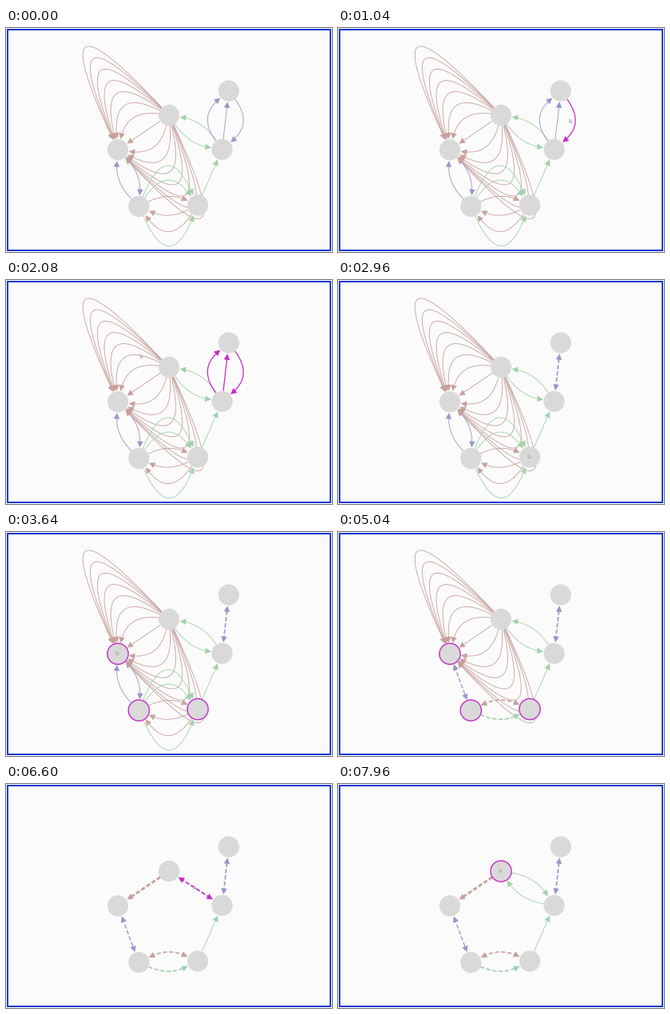
Recreate the animation shown at these times as a matplotlib script. Size 408 px wide and 280 px high, loop 8000 ms.

```python
import numpy as np
import matplotlib.pyplot as plt
from matplotlib.animation import FuncAnimation
from matplotlib.patches import Circle, FancyBboxPatch, PathPatch, Polygon, Rectangle
from matplotlib.path import Path

W, H, DPI = 408, 280, 100
STEP_MS, LOOP_MS = 40, 8000
PX = 72 / DPI            # points per pixel
ZOOM = 0.87
RADIUS = 13.1
SPREAD = 34.7            # gap between control points of parallel edges
HEAD = 29 * ZOOM         # nominal arrow size
PICKED = "#c42cc6"
COLORS = {"R": "#c7a29d", "G": "#a0d2ab", "B": "#9a97c9"}

NODES = {
    "A": (204, 109), "B": (140, 152.3), "C": (166.3, 223),
    "D": (240, 221.5), "E": (270.5, 151.8), "F": (278.8, 78.5),
}

# Bundle of parallel edges: (start ms, tokens). A token is a colour, a direction
# and, for a collapsed edge, the number of edges it stands for.
BUNDLES = {
    "AB": [(0, "R> " * 15), (5960, "R>15")],
    "CD": [(0, "G> G> R> R< R< G>"), (4400, "R=3 G>3")],
    "BC": [(0, "B> B<"), (4400, "B=2")],
    "AE": [(0, "G< G>"), (5960, "G=2"), (7400, "G> G<")],
    "EF": [(0, "B> B> B<"), (2520, "B=3")],
    "DE": [(0, "G>")],
}

# Pointer visits: enter, leave, deselect (ms), then what is pressed and when
VISITS = [
    (200, 2160, 2520, {"EF2": 840, "EF1": 1720, "EF0": 1920}),
    (2520, 3840, 5960, {"D": 3000, "C": 3240, "B": 3520}),
    (5960, 6720, 7400, {"AE0": 6480}),
    (7400, 8200, 8200, {"A": 7800}),
]
HOLD, TRAVEL, EXIT = 80, 400, 120
DOOR = np.array([2, 60])     # where the pointer enters and leaves
POINTER = 0.8 * np.array([(0, 0), (0, 5), (1.4, 3.9), (2.4, 5.6), (3.2, 5.2),
                          (2.4, 3.5), (4, 3.4)])

plt.rcParams["lines.scale_dashes"] = False
fig = plt.figure(figsize=(W / DPI, H / DPI), dpi=DPI, facecolor="white")
ax = fig.add_axes([0, 0, 1, 1])
ax.set_xlim(0, W)
ax.set_ylim(H, 0)
ax.axis("off")
ax.add_patch(Rectangle((2, 2), W - 4, H - 4, fc="#fbfbfb", ec="#1638d4",
                       lw=2 * PX, snap=False, zorder=0))
pointer = ax.add_patch(Polygon(POINTER, fc="#f4f4f4", ec="#969696",
                               lw=0.6 * PX, zorder=9))
scene = []
shown = None


def unit(v):
    return v / np.hypot(*v)


def tokens_at(bundle, t):
    return [spec for start, spec in BUNDLES[bundle] if start <= t][-1].split()


def curve(bundle, i, n):
    """Centre of both nodes and the control point of edge i out of n."""
    a, b = (np.array(NODES[k]) for k in bundle)
    dx, dy = unit(b - a)
    ctrl = (a + b) / 2 + (i - (n - 1) / 2) * SPREAD * np.array([-dy, dx])
    return a, ctrl, b


def trim(a, ctrl, b, start, end):
    return [a + unit(ctrl - a) * start, ctrl, b + unit(ctrl - b) * end]


def add(patch):
    scene.append(ax.add_patch(patch))


def stroke(points, color, width, **kw):
    codes = [Path.MOVETO] + [Path.CURVE3] * 2
    add(PathPatch(Path(points, codes), fc="none", ec=color, lw=width * PX,
                  capstyle="butt", **kw))


def arrow(tip, out, color):
    base = tip + out * 0.3 * HEAD
    half = np.array([-out[1], out[0]]) * 0.15 * HEAD
    add(Polygon([tip, base + half, base - half], fc=color, ec="none", zorder=4))


def draw_edge(a, ctrl, b, token, picked, pressed):
    kind, way, count = token[0], token[1], int(token[2:] or 1)
    color = PICKED if picked else COLORS[kind]
    width = ZOOM * (1 + 0.6 * np.log2(count)) + 0.4 * picked
    gaps = []
    for node, heads in ((a, "<="), (b, ">=")):
        has_head = way in heads
        gaps.append(RADIUS + 4 * has_head)
        if has_head:
            out = unit(ctrl - node)
            arrow(node + out * (RADIUS + 0.7), out, color)
    dash = (0, (6 * ZOOM * PX, 3 * ZOOM * PX)) if count > 1 else "-"
    stroke(trim(a, ctrl, b, *gaps), color, width, ls=dash, zorder=3)
    if pressed:
        stroke(trim(a, ctrl, b, 11, 11), "black", 18, alpha=0.27, zorder=4.5)


def draw_node(name, picked, pressed):
    x, y = NODES[name]
    add(Circle((x, y), RADIUS, fc="#d9d9d9", ec=PICKED if picked else "none",
               lw=1.4 * PX, zorder=5))
    if pressed:
        add(FancyBboxPatch((x - 16, y - 16), 32, 32, fc="black", ec="none", alpha=0.25,
                           boxstyle="round,pad=6,rounding_size=6", zorder=6))


def state_at(t):
    edges = tuple((bundle, tuple(tokens_at(bundle, t))) for bundle in BUNDLES)
    clicks = [(name, down, end) for *_, end, presses in VISITS
              for name, down in presses.items()]
    pressed = tuple(n for n, down, _ in clicks if down <= t < down + HOLD)
    picked = tuple(n for n, down, end in clicks if down + HOLD <= t < end)
    return edges, pressed, picked


def draw_scene(edges, pressed, picked):
    while scene:
        scene.pop().remove()
    for bundle, tokens in edges:
        for i, token in enumerate(tokens):
            key = f"{bundle}{i}"
            draw_edge(*curve(bundle, i, len(tokens)), token,
                      key in picked, key in pressed)
    for name in NODES:
        draw_node(name, name in picked, name in pressed)


def spot(name, t):
    """Where the pointer presses a node or the middle of an edge."""
    if name in NODES:
        return np.array(NODES[name]) - (2, 3)
    bundle, i = name[:2], int(name[2:])
    a, ctrl, b = trim(*curve(bundle, i, len(tokens_at(bundle, t))), RADIUS, RADIUS)
    return (a + 2 * ctrl + b) / 4 - (2, 3)


def pointer_at(t):
    for enter, leave, _, presses in VISITS:
        if not enter <= t < leave:
            continue
        pos, free = DOOR, enter
        moves = [(spot(name, t), down) for name, down in presses.items()]
        for goal, down in moves:
            u = np.clip((t - free) / min(TRAVEL, down - STEP_MS - free), 0, 1)
            pos = pos + (goal - pos) * u * u * (3 - 2 * u)
            free = down + HOLD
        u = np.clip((t - leave + EXIT) / EXIT, 0, 1)
        return pos + (DOOR - pos) * u
    return None


def update(i):
    global shown
    t = i * STEP_MS
    state = state_at(t)
    if state != shown:
        draw_scene(*state)
        shown = state
    pos = pointer_at(t)
    pointer.set_visible(pos is not None)
    if pos is not None:
        pointer.set_xy(POINTER + pos)
    return [*scene, pointer]


anim = FuncAnimation(fig, update, frames=LOOP_MS // STEP_MS, interval=STEP_MS,
                     repeat=True, repeat_delay=0, blit=False)
plt.show()
```
